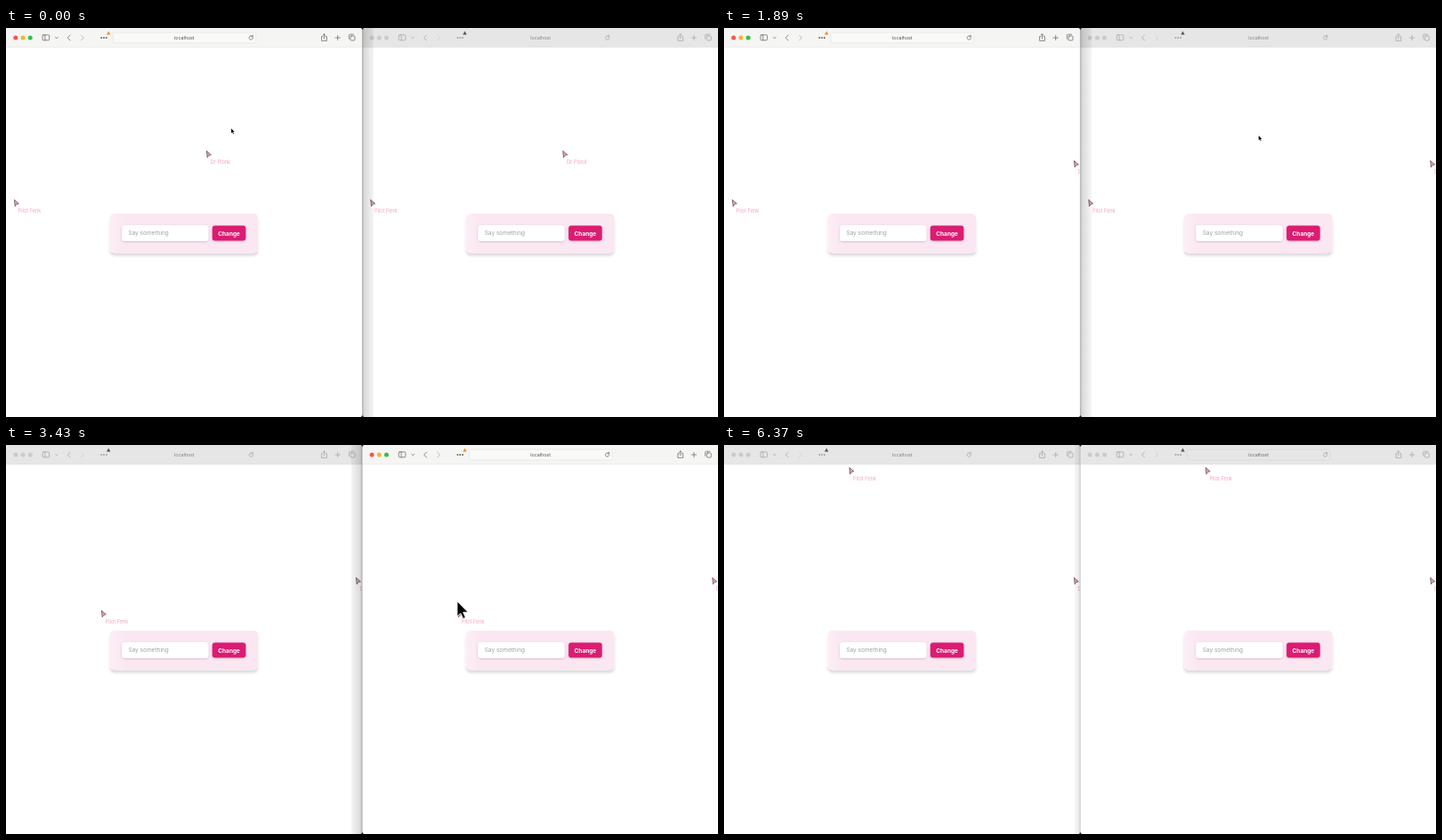
These frames come from a looping animation (800x438 px, 6.86 s). An HTML page:

```html
<!DOCTYPE html>
<html lang="en">
<head>
<meta charset="utf-8">
<title>Shared cursors</title>
<style>
html, body { margin: 0; width: 100%; height: 100%; overflow: hidden; background: #fff; }
svg { display: block; width: 100%; height: 100%; }
text { font-family: Inter, "Liberation Sans", sans-serif; }
.win {
  --bar: #e6e6e6; --rule: #d9d9d9; --ink: #a6a6a6; --faint: #cdcdcd; --title: #808080;
  --field: transparent; --edge: transparent; --warn: #555;
  --red: #cbcbcb; --amber: #cbcbcb; --green: #cbcbcb;
}
.win.on {
  --bar: #f5f5f4; --rule: #e2e2e1; --ink: #686868; --faint: #a8a8a8; --title: #505050;
  --field: #f9f9f8; --edge: #e6e6e5; --warn: #f58a1f;
  --red: #f2564f; --amber: #f6b52f; --green: #32c146;
}
.win.rest { --title: #666; --edge: #d9d9d9; }
.line { fill: none; stroke: var(--ink); stroke-width: .75; stroke-linecap: round; stroke-linejoin: round; }
.tag { font-size: 5.6px; fill: #f3a3c3; }
</style>
</head>
<body>
<svg viewBox="0 0 800 438" preserveAspectRatio="none">
  <defs>
    <clipPath id="pane"><rect width="400" height="438"/></clipPath>
    <linearGradient id="pink">
      <stop offset="0" stop-color="#fceef5"/>
      <stop offset=".1" stop-color="#fbe7f1"/>
    </linearGradient>
    <linearGradient id="shade">
      <stop offset="0" stop-color="#000" stop-opacity=".28"/>
      <stop offset=".2" stop-color="#000" stop-opacity=".14"/>
      <stop offset="1" stop-color="#000" stop-opacity=".04"/>
    </linearGradient>
    <filter id="cardShadow" x="-10%" y="-20%" width="120%" height="160%">
      <feDropShadow dx="0" dy="3.2" stdDeviation="1.8" flood-opacity=".15"/>
    </filter>
    <filter id="softShadow" x="-10%" y="-20%" width="120%" height="160%">
      <feDropShadow dx="0" dy=".8" stdDeviation=".8" flood-opacity=".18"/>
    </filter>

    <g id="chrome">
      <rect width="400" height="21.5" fill="var(--bar)"/>
      <path d="M0 21.6H400" stroke="var(--rule)" stroke-width=".6"/>
      <circle cx="10.8" cy="11" r="2.5" fill="var(--red)"/>
      <circle cx="19" cy="11" r="2.5" fill="var(--amber)"/>
      <circle cx="27.2" cy="11" r="2.5" fill="var(--green)"/>
      <g class="line">
        <rect x="41" y="7.8" width="7.6" height="6" rx="1"/>
        <path d="M43.8 7.8v6M55.5 10.4l1.4 1.3 1.4-1.3M72.2 8l-2.9 3 2.9 3"/>
        <path d="M84.4 8l2.9 3-2.9 3" stroke="var(--faint)"/>
        <path d="M355.8 9.6h-1.2v4.8h5.8V9.6h-1.2M357.5 12V6.9M356 8.2l1.5-1.5 1.5 1.5"/>
        <path d="M370 11h5.4M372.7 8.3v5.4"/>
        <rect x="387" y="9" width="5" height="5" rx="1"/>
        <path d="M385.4 12.2V8.1a.9.9 0 0 1 .9-.9h4.2"/>
      </g>
      <path d="M107.2 11h5.7" stroke="var(--ink)" stroke-width="2" stroke-linecap="round" stroke-dasharray="0 2.8"/>
      <path d="M115.2 3.6l2.2 3.8h-4.4z" fill="var(--warn)"/>
      <rect x="120" y="5" width="161" height="12" rx="2.5" fill="var(--field)" stroke="var(--edge)" stroke-width=".8"/>
      <text x="200.3" y="12.9" text-anchor="middle" font-size="5.3" fill="var(--title)">localhost</text>
      <path class="line" d="M277.1 9.6a2.2 2.2 0 1 0 .5 1.5M277.3 8v1.8h-1.8"/>
    </g>

    <g id="card">
      <rect x="116.7" y="209" width="166.5" height="44.3" rx="5" fill="url(#pink)" filter="url(#cardShadow)"/>
      <rect x="130" y="222" width="97.4" height="18" rx="3.5" fill="#fff" filter="url(#softShadow)"/>
      <text x="137.4" y="233.3" font-size="6.5" fill="#9f9ea2">Say something</text>
      <rect x="231.8" y="222.4" width="37.6" height="17.2" rx="3" fill="#db1a72" filter="url(#softShadow)"/>
      <text x="250.6" y="233.5" text-anchor="middle" font-size="6.5" font-weight="700" fill="#fff">Change</text>
    </g>

    <path id="peer" d="M.4.4L5.4 4.8 2.8 5.3 1.2 7.8z" fill="#e8a5bd" stroke="#6d4a57" stroke-width=".8" stroke-linejoin="round"/>
    <g id="guest"><use href="#peer"/><text class="tag" x="4.6" y="15.4">Pilot Fenk</text></g>
    <g id="host"><use href="#peer"/><text class="tag" x="4.8" y="15">Dr Plonk</text></g>
    <g id="page">
      <use href="#chrome"/><use href="#card"/>
      <use class="guest" href="#guest"/><use class="host" href="#host"/>
    </g>
  </defs>

  <rect width="800" height="438" fill="#fff"/>
  <g class="win" clip-path="url(#pane)"><use href="#page"/></g>
  <g class="win" clip-path="url(#pane)" transform="translate(400.3)"><use href="#page"/></g>
  <rect id="band" width="1" height="438" fill="url(#shade)"/>
  <path d="M400.3 0V438" stroke="#000" stroke-opacity=".2" stroke-width=".6"/>
  <path d="M399 0h2.8l-1.4 2zM399 438h2.8l-1.4-2z" fill="#222"/>
  <circle id="ring" r="8" fill="#eef2fd" fill-opacity=".7" stroke="#b0bdec" stroke-width="1.6"/>
  <path id="mouse" d="M0 0V5.6L1.3 4.5 2.2 6.5 3.1 6.1 2.2 4.1H4z" fill="#000" stroke="#fff" stroke-width=".25"/>
</svg>
<script>
const LOOP = 6860, TICK = 70;
const CLICK = 30, EXIT = 75, BLUR = 84;
const PANE = 400.3;

// Where the mouse turns or rests: [tick, x, y].
const turns = [
  [-1, 222, 136], [0, 253, 113], [3, 272, 112], [7, 239, 140], [13, 236, 148],
  [19, 582, 146], [22, 582, 146], [31, 614, 103], [39, 669, 116], [45, 502, 166],
  [47, 560, 150], [48, 504, 184], [49, 507, 176], [61, 527, 165], [72, 527, 165],
  [EXIT, 537.5, 23], [77, 541, 4], [92, 552, -8]
];

const clamp = (v, lo, hi) => Math.min(hi, Math.max(lo, v));
const smooth = f => f * f * (3 - 2 * f);

function mouseAt(tick) {
  const i = turns.findIndex(p => p[0] > tick);
  if (i < 0) return turns[turns.length - 1].slice(1);
  const [t0, x0, y0] = turns[i - 1], [t1, x1, y1] = turns[i];
  const f = smooth((tick - t0) / (t1 - t0));
  return [x0 + (x1 - x0) * f, y0 + (y1 - y0) * f];
}

// Shared cursors trail the mouse by one tick while it is over their window.
function hostAt(tick) {
  const [x, y] = mouseAt(Math.min(tick - 1, 16));
  return [Math.min(x, 390) + 3, y + 2];
}
function guestAt(tick) {
  if (tick < CLICK) return [9, 193];
  const [x, y] = mouseAt(Math.min(tick - 1, EXIT));
  return [x - PANE + 3.3, y + 2];
}

// The pointer grows for a moment after being shaken.
const mouseSize = tick => 1 + 2 * clamp((4.5 - Math.abs(tick - 50)) / 2, 0, 1);

const byId = id => document.getElementById(id);
const place = (el, pos, scale = "1") =>
  el.setAttribute("transform", `translate(${pos}) scale(${scale})`);

const [left, right] = document.querySelectorAll(".win");
const guest = byId("guest"), host = byId("host");
const band = byId("band"), ring = byId("ring"), mouse = byId("mouse");

function draw(tick) {
  const leftOn = tick < CLICK, blurred = tick >= BLUR;
  left.classList.toggle("on", leftOn);
  right.classList.toggle("on", !leftOn && !blurred);
  right.classList.toggle("rest", blurred);
  place(band, [PANE, 0], `${leftOn ? 12.7 : blurred ? -6.5 : -12.5} 1`);
  band.setAttribute("opacity", blurred ? .6 : 1);

  const pos = mouseAt(tick);
  place(mouse, pos, mouseSize(tick));
  place(ring, pos);
  ring.setAttribute("opacity", tick >= CLICK && tick < CLICK + 4 ? 1 : 0);
  place(guest, guestAt(tick));
  place(host, hostAt(tick));
}

function loop() {
  draw(Math.floor(performance.now() % LOOP / TICK));
  requestAnimationFrame(loop);
}
loop();
</script>
</body>
</html>
```
